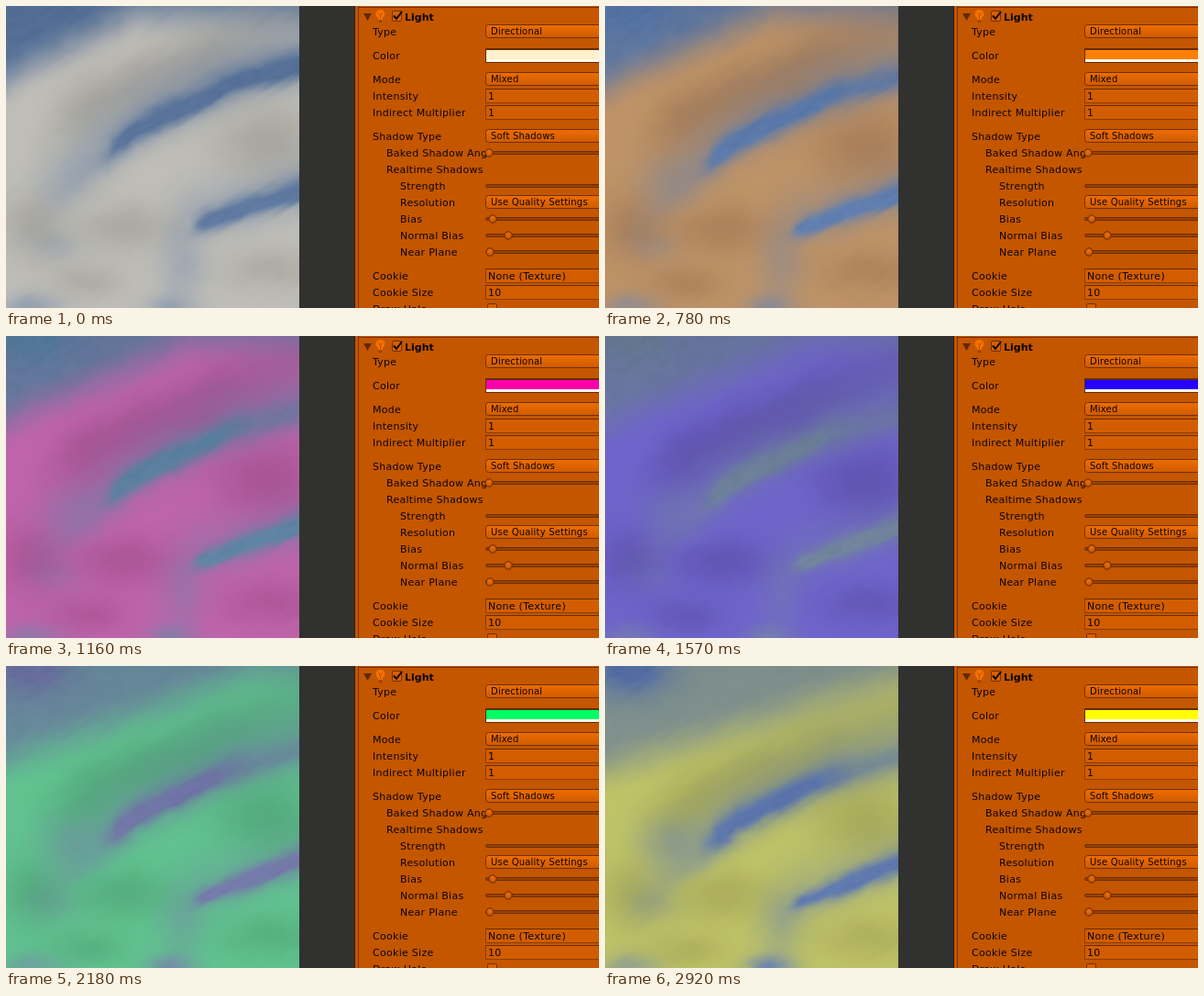
Animation, 647 px wide and 329 px high, one loop 2950 ms. Source, as an HTML page with a canvas:

```html
<!DOCTYPE html>
<html lang="en">
<head>
<meta charset="utf-8">
<title>Light inspector</title>
<style>
  html, body { margin: 0; width: 100%; height: 100%; overflow: hidden; background: #313130; }
  #stage { position: relative; width: 647px; height: 329px; overflow: hidden; }
  #sky { position: absolute; left: 0; top: 0; width: 320px; height: 330px; }
  svg { position: absolute; left: 0; top: 0; }
  text { font-family: "DejaVu Sans", Verdana, sans-serif; font-size: 11px; fill: #0c0400; letter-spacing: .28px; }
  .small { font-size: 10px; letter-spacing: .2px; }
  .bold { font-weight: bold; letter-spacing: 0; }
</style>
</head>
<body>
<div id="stage">
  <canvas id="sky" width="160" height="165"></canvas>
  <svg width="647" height="329">
    <defs>
      <linearGradient id="popup" x2="0" y2="1">
        <stop offset="0" stop-color="#ee6d00"/><stop offset="1" stop-color="#cf5b00"/>
      </linearGradient>
      <radialGradient id="knob" cy=".35">
        <stop offset="0" stop-color="#ee7010"/><stop offset="1" stop-color="#c65700"/>
      </radialGradient>
    </defs>
    <rect x="320" width="61" height="329" fill="#313130"/>
    <rect x="380" width="1" height="329" fill="#242424"/>
    <rect x="381" width="266" height="329" fill="#c45600"/>
    <rect x="384" width="1" height="329" fill="#7b3500"/>
    <rect x="384" y="1" width="263" height="1" fill="#6c2f00"/>
    <path d="M390 8h9l-4.500 8z" fill="#642900"/>
    <path d="M406 13c-4-3-3-9 2.500-9s6.500 6 2.500 9v2h-5z" fill="#f57100"/>
    <path d="M406.500 7.500l2 3 2-3M408.500 10v4" fill="none" stroke="#b84d00"/>
    <path d="M406.500 16h4M407 17.500h3" stroke="#8b3b00"/>
    <rect x="421.500" y="5.500" width="10" height="11" rx="1.500" fill="#d76100" stroke="#713000"/>
    <path d="M423 10.500l3 3.500 6-8" fill="none" stroke="#100500" stroke-width="2"/>
    <text class="bold" x="435" y="16">Light</text>
    <g id="panel"></g>
    <rect x="523.500" y="46.500" width="130" height="15" fill="#fff9ea" stroke="#642c00"/>
    <rect x="523" y="47" width="124" height="1" fill="#642c00"/>
    <rect id="swatch" x="524" y="48" width="123" height="10"/>
    <rect x="525.500" y="324.500" width="10" height="10" rx="1.500" fill="#d76100" stroke="#713000"/>
  </svg>
</div>
<script>
const LOOP = 2950, W = 160, H = 165;

// Inspector rows: label, x, row centre, kind of control, value or knob position
const rows = [
  ["Type", 400, 28, "popup", "Directional"],
  ["Color", 400, 54],
  ["Mode", 400, 80, "popup", "Mixed"],
  ["Intensity", 400, 98, "field", "1"],
  ["Indirect Multiplier", 400, 116, "field", "1"],
  ["Shadow Type", 400, 142, "popup", "Soft Shadows"],
  ["Baked Shadow Ang", 415, 160, "slider", 527],
  ["Realtime Shadows", 415, 178],
  ["Strength", 430, 196, "slider", 700],
  ["Resolution", 430, 214, "popup", "Use Quality Settings"],
  ["Bias", 430, 232, "slider", 531],
  ["Normal Bias", 430, 250, "slider", 548],
  ["Near Plane", 430, 268, "slider", 528],
  ["Cookie", 400, 294, "field", "None (Texture)"],
  ["Cookie Size", 400, 312, "field", "10"],
  ["Draw Halo", 400, 330]
];
const controls = {
  popup: (y, v) => `<rect x="523.5" y="${y - 7.5}" width="130" height="14" rx="3" fill="url(#popup)" stroke="#713000"/>
    <text class="small" x="529" y="${y + 3}">${v}</text>`,
  field: (y, v) => `<rect x="523.5" y="${y - 7.5}" width="130" height="15" fill="#d25d00" stroke="#8b3c00"/>
    <path d="M523 ${y - 7.5}h124" stroke="#682c00"/><text x="526" y="${y + 4}">${v}</text>`,
  slider: (y, v) => `<rect x="523.5" y="${y - 1.5}" width="130" height="3" rx="1.5" fill="#994200" stroke="#6d2e00"/>
    <circle cx="${v}" cy="${y}" r="4.2" fill="url(#knob)" stroke="#642900"/>`
};
document.getElementById("panel").innerHTML = rows.map(([label, x, y, kind, value]) =>
  `<text x="${x}" y="${y + 4}">${label}</text>` + (kind ? controls[kind](y, value) : "")).join("");

// Light keys: time, hue, saturation
const keys = [
  [0, 44, .2], [450, 43, 1], [780, 30, 1], [1160, -40, 1], [1570, -111, 1],
  [1800, -160, 1], [2180, -216, 1], [2770, -300, 1], [LOOP, -300, 1]
];
const mix = (a, b, k) => a + (b - a) * k;
const clamp = v => Math.max(0, Math.min(1, v));
const smooth = (a, b, v) => { const k = clamp((v - a) / (b - a)); return k * k * (3 - 2 * k); };

function lightAt(t) {
  const i = Math.max(1, keys.findIndex(k => k[0] > t));
  const a = keys[i - 1], b = keys[i], k = (t - a[0]) / (b[0] - a[0]);
  const hue = mix(a[1], b[1], k), sat = mix(a[2], b[2], k);
  return [5, 3, 1].map(n => {
    const m = (((n + hue / 60) % 6) + 6) % 6;
    return 1 - sat * clamp(Math.min(m, 4 - m));
  });
}

function hash(x, y) {
  const s = Math.sin(x * 127.1 + y * 311.7) * 43758.5453;
  return s - Math.floor(s);
}
function noise(x, y) {
  const i = Math.floor(x), j = Math.floor(y);
  const u = smooth(0, 1, x - i), v = smooth(0, 1, y - j);
  return mix(mix(hash(i, j), hash(i + 1, j), u), mix(hash(i, j + 1), hash(i + 1, j + 1), u), v) - .5;
}
const bell = (x, y, cx, cy, rx, ry) => Math.exp(-(((x - cx) / rx) ** 2) - ((y - cy) / ry) ** 2);
const ridge = (d, up, down) => Math.exp(-((d / (d < 0 ? up : down)) ** 2));

// Fixed noise that roughens the cloud edges
const rough = new Float32Array(W * H * 2);
for (let i = 0; i < W * H; i++) {
  const x = i % W * 2, y = Math.floor(i / W) * 2;
  rough[2 * i] = noise(x / 30, y / 24) * 6 + noise(x / 11, y / 8 + 40) * 5;
  rough[2 * i + 1] = noise(x / 28 + 70, y / 22) * 5 + noise((x + y) / 14 + 9, (y + x * .6) / 6) * 4;
}

// How much open sky shows through; u runs from 0 to 1 over the loop
function openSky(x, y, u, drift) {
  const edge = Math.max(3, 75 + 35 * u - (.5 - .19 * u) * x);
  const top = smooth(-38, 30, edge - y) * (1 - .4 * u) + .5 * u * bell(x, y, 28, 2, 42, 30);

  const p = x - 120;
  const d1 = y - (154 - .68 * p + .0012 * p * p + drift);
  const far = 1 - .62 * smooth(0, .5, u) * smooth(205, 285, x);
  const middle = .75 * ridge(d1, 18, 13) * smooth(95, 135, x) * far
    + .4 * ridge(d1, 50, 24) * smooth(0, 110, x);

  const q = x - 205;
  const d2 = y - (237 + 23 * u - (.27 + .1 * u) * q);
  const lower = .85 * ridge(d2, 9 + Math.max(0, q) * .12 * (1 - .5 * u), 10) * smooth(194, 218, x)
    + .3 * ridge(d2, 38, 22) * smooth(150, 215, x);

  const haze = (.1 + .25 * u) * bell(x, y, 70, 190, 32, 27)
    + .3 * bell(x, y, 192, 285, 24, 36)
    + .22 * bell(x, y, 54, 262, 28, 18)
    + .45 * bell(x, y, 26, 328, 32, 15)
    + (.4 + .45 * u) * bell(x, y, 180, 328, 25, 13);
  return clamp(1 - (1 - clamp(top)) * (1 - clamp(middle)) * (1 - clamp(lower)) * (1 - clamp(haze)));
}

function shadeAt(x, y, u) {
  const s = 10 * u;
  return clamp(.2 + .8 * ridge(y - (146 + 40 * u - .42 * x), 34, 36) * smooth(20, 95, x) * (1 - .4 * smooth(200, 320, x))
    + .8 * bell(x, y, 285, 148 + 2 * s, 52, 38)
    + .7 * bell(x, y, 130, 242 + s, 48, 27)
    + .7 * bell(x, y, 28, 240 + s, 36, 34)
    + .6 * bell(x, y, 88, 300 + s, 38, 18)
    + .6 * bell(x, y, 290, 286 + s, 54, 22));
}

const ctx = document.getElementById("sky").getContext("2d");
const image = ctx.createImageData(W, H), px = image.data;
const swatch = document.getElementById("swatch");

function draw(t) {
  const u = t / LOOP, drift = 36 * u ** .75;
  const [r, g, b] = lightAt(t);
  const lit = [100 + 96 * r, 104 + 96 * g, 106 + 104 * b];
  const dim = [84 + 86 * r, 84 + 88 * g, 90 + 88 * b];
  const sky = [102 - 20 * r, 118 - 10 * g, 162 - 18 * b];

  for (let i = 0; i < W * H; i++) {
    const x = i % W * 2 + 1, y = Math.floor(i / W) * 2 + 1;
    const nx = rough[2 * i], ny = rough[2 * i + 1];
    const open = openSky(x + nx, y + ny, u, drift);
    const shade = shadeAt(x + nx * 1.5, y + ny * 1.5, u);
    const streak = Math.sin(ny * 1.8 + nx * .5) * 2 * open;
    for (let c = 0; c < 3; c++) {
      const back = sky[c] + y * .06 + streak;
      px[4 * i + c] = mix(mix(lit[c], dim[c], shade), back, open);
    }
    px[4 * i + 3] = 255;
  }
  ctx.putImageData(image, 0, 0);
  swatch.setAttribute("fill", `rgb(${[r, g, b].map(v => Math.round(v * 255))})`);
}

const start = performance.now();
function tick() {
  draw((performance.now() - start) % LOOP);
  requestAnimationFrame(tick);
}
tick();
</script>
</body>
</html>
```
